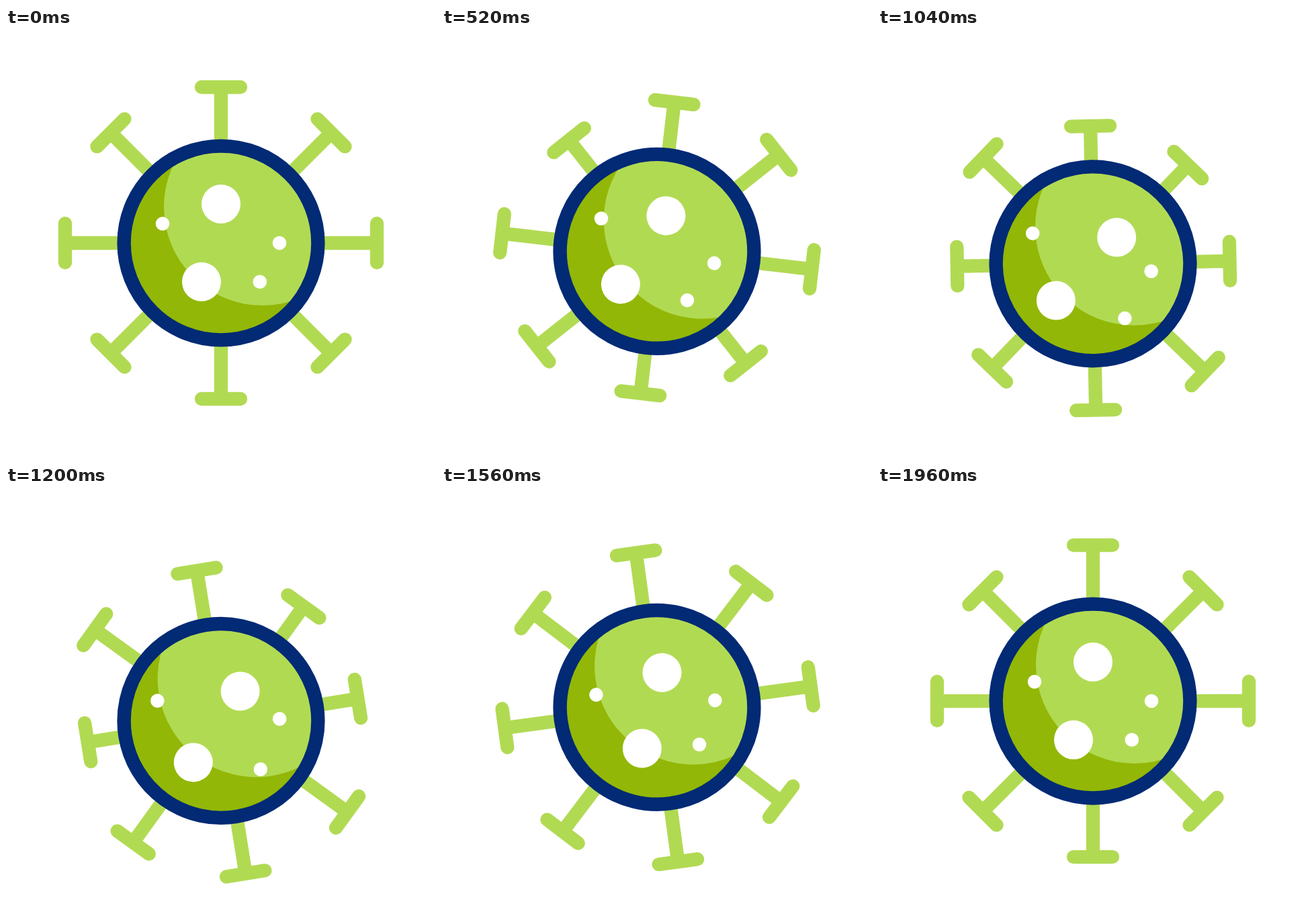
Recreate the animation shown at these times as an HTML page. Size 640 px wide and 640 px high, loop 2 s.

```html
<!DOCTYPE html>
<html lang="en">
<head>
<meta charset="utf-8">
<title>Virus</title>
<style>
  html, body { margin: 0; width: 100%; height: 100%; overflow: hidden; background: #fff; }
  svg { display: block; width: 100%; height: 100%; }

  .virus, .arm, .spot {
    animation: 2s cubic-bezier(.6, 0, .4, 1) infinite;
  }
  .virus { animation-name: sink, sway; }

  @keyframes sink {
    0%, 2% { translate: 0 0; animation-timing-function: cubic-bezier(.66, 0, .42, 1); }
    51% { translate: 0 30.8px; animation-timing-function: cubic-bezier(.58, 0, .34, 1); }
    100% { translate: 0 0; }
  }
  @keyframes sway {
    0%, 2%, 99%, 100% { rotate: 0deg; }
    38.5% { rotate: 8.05deg; }
    65.5% { rotate: -10.05deg; }
  }

  /* Arms retract towards the body, one after another */
  @keyframes n  { 0%, 16%, 69%, 100% { translate: 0 0; } 42% { translate: 0 35px; } }
  @keyframes ne { 0%, 22%, 80%, 100% { translate: 0 0; } 48% { translate: 0 28.8px; } }
  @keyframes e  { 0%, 27%, 84%, 100% { translate: 0 0; } 51.5% { translate: 0 28.5px; } }
  @keyframes se { 0%, 4%, 57%, 100% { translate: 0 0; } 27% { translate: 0 19.3px; } }
  @keyframes s  { 0%, 10%, 66%, 100% { translate: 0 0; } 38% { translate: 0 28.5px; } }
  @keyframes sw { 0%, 15%, 76%, 100% { translate: 0 0; } 44% { translate: 0 17.4px; } }
  @keyframes w  { 0%, 31%, 86%, 100% { translate: 0 0; } 57.5% { translate: 0 31.4px; } }
  @keyframes nw { 0%, 6%, 64%, 100% { translate: 0 0; } 32% { translate: 0 22.7px; } }

  /* Spots drift inside the body */
  @keyframes top    { 0%, 10.5%, 98.5%, 100% { translate: 0 0; } 54% { translate: 36px 19.5px; } }
  @keyframes bottom { 0%, 2%, 86%, 100% { translate: 0 0; } 44% { translate: -28.4px -4.2px; } }
  @keyframes left   { 0%, 5%, 91%, 100% { translate: 0 0; } 45.5% { translate: -2px -18.6px; } }
  @keyframes right  { 0%, 4%, 91%, 100% { translate: 0 0; } 45% { translate: -.6px 13.2px; } }
  @keyframes low    { 0%, 6%, 95%, 100% { translate: 0 0; } 50% { translate: -12px 24.5px; } }
</style>
</head>
<body>
<svg viewBox="0 0 640 640">
  <defs>
    <clipPath id="disc"><circle r="140"/></clipPath>
    <path id="spike" d="M0-100V-232M-29-232H29"/>
  </defs>
  <g transform="translate(320 320)">
    <g class="virus">
      <g fill="none" stroke="#b1da53" stroke-width="20.3" stroke-linecap="round">
        <g><use class="arm" href="#spike" style="animation-name: n"/></g>
        <g transform="rotate(45)"><use class="arm" href="#spike" style="animation-name: ne"/></g>
        <g transform="rotate(90)"><use class="arm" href="#spike" style="animation-name: e"/></g>
        <g transform="rotate(135)"><use class="arm" href="#spike" style="animation-name: se"/></g>
        <g transform="rotate(180)"><use class="arm" href="#spike" style="animation-name: s"/></g>
        <g transform="rotate(225)"><use class="arm" href="#spike" style="animation-name: sw"/></g>
        <g transform="rotate(270)"><use class="arm" href="#spike" style="animation-name: w"/></g>
        <g transform="rotate(315)"><use class="arm" href="#spike" style="animation-name: nw"/></g>
      </g>
      <circle r="140" fill="#92b706"/>
      <g clip-path="url(#disc)"><circle cx="61.7" cy="-53.7" r="146.7" fill="#b1da53"/></g>
      <circle r="144.4" fill="none" stroke="#022a75" stroke-width="20.4"/>
      <g fill="#fff">
        <circle class="spot" cx="0" cy="-58" r="29" style="animation-name: top"/>
        <circle class="spot" cx="-29" cy="57.8" r="29" style="animation-name: bottom"/>
        <circle class="spot" cx="-87" cy="-28.7" r="10.3" style="animation-name: left"/>
        <circle class="spot" cx="87" cy="0" r="10.3" style="animation-name: right"/>
        <circle class="spot" cx="57.8" cy="57.7" r="10.3" style="animation-name: low"/>
      </g>
    </g>
  </g>
</svg>
</body>
</html>
```
